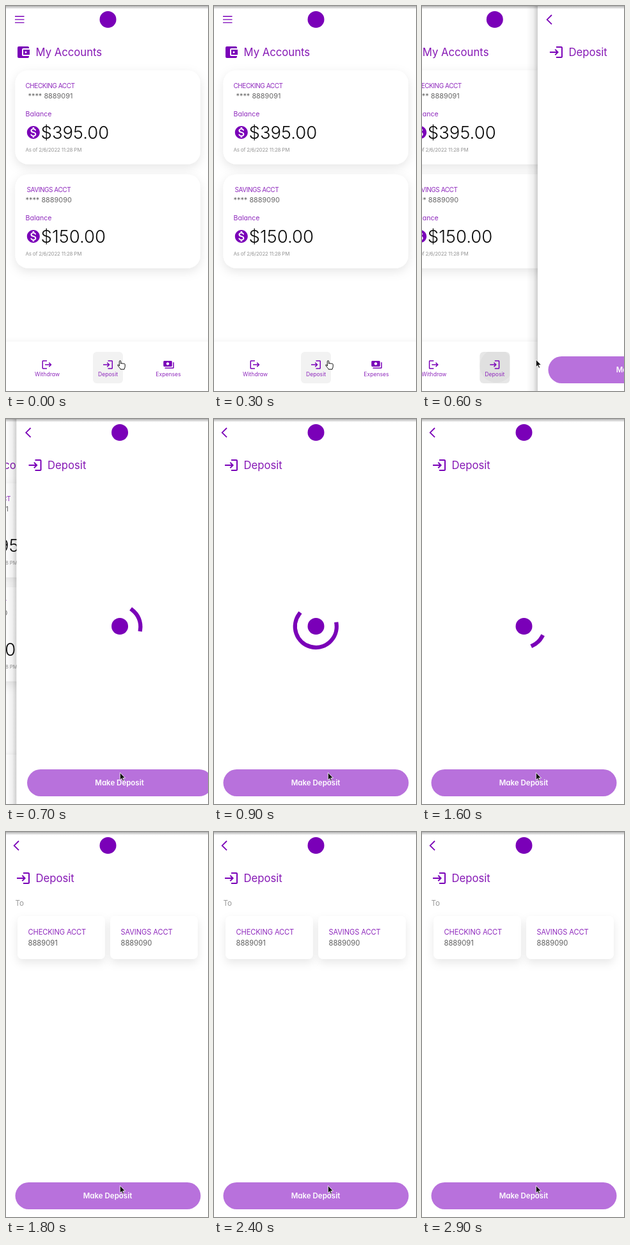
An HTML page for the animation above (3.2 s loop, 316 by 600 pixels).

```html
<!DOCTYPE html>
<html lang="en">
<head>
<meta charset="utf-8">
<title>Deposit flow</title>
<style>
  html, body { margin: 0; width: 100%; height: 100%; overflow: hidden; background: #fff; }
  svg { display: block; width: 100vw; height: 100vh; }
  text { font-family: Inter, "Open Sans", sans-serif; font-feature-settings: "cv11"; fill: #8f2abd; white-space: pre; }
  .icon { fill: #7a00b8; }
  .line { fill: none; stroke: #7a00b8; }
  .title { font-size: 16.7px; fill: #8618b5; }
  .acct { font-size: 10px; letter-spacing: -.45px; }
  .num { font-size: 10.9px; fill: #666; }
  .label { font-size: 10.6px; }
  .sum { font-size: 27.5px; font-weight: 300; fill: #0c0c0c; }
  .date { font-size: 8px; letter-spacing: -.22px; fill: #959595; }
  .tab { font-size: 8.6px; text-anchor: middle; }
  .to { font-size: 11.6px; fill: #999; }
  .pick { font-size: 11.1px; letter-spacing: -.1px; }
  .id { font-size: 11.2px; fill: #606060; }
  .action { font-size: 11.5px; font-weight: 600; text-anchor: middle; fill: #fff; }
</style>
</head>
<body>
<svg viewBox="0 0 316 600" preserveAspectRatio="none" xmlns="http://www.w3.org/2000/svg">
  <defs>
    <filter id="soft" x="-20%" y="-30%" width="140%" height="170%">
      <feDropShadow dx="0" dy="5" stdDeviation="8" flood-color="#000" flood-opacity=".1"/>
    </filter>
    <filter id="low" x="-30%" y="-40%" width="160%" height="200%">
      <feDropShadow dx="0" dy="6" stdDeviation="7" flood-color="#000" flood-opacity=".09"/>
    </filter>
    <filter id="lift" x="-5%" y="-30%" width="110%" height="150%">
      <feDropShadow dx="0" dy="-1" stdDeviation="3" flood-color="#000" flood-opacity=".05"/>
    </filter>
    <linearGradient id="edge">
      <stop offset="0" stop-color="#000" stop-opacity="0"/>
      <stop offset=".6" stop-color="#000" stop-opacity=".06"/>
      <stop offset="1" stop-color="#000" stop-opacity=".2"/>
    </linearGradient>
    <linearGradient id="top" x2="0" y2="1">
      <stop offset="0" stop-color="#000" stop-opacity=".3"/>
      <stop offset="1" stop-color="#000" stop-opacity="0"/>
    </linearGradient>
    <clipPath id="tabClip"><rect x="136" y="539" width="47" height="49" rx="6"/></clipPath>
    <path id="login" d="M11 7 9.6 8.4l2.6 2.6H2v2h10.2l-2.6 2.6L11 17l5-5zM20 19h-8v2h8c1.1 0 2-.9 2-2V5c0-1.1-.9-2-2-2h-8v2h8z"/>
    <path id="logout" d="M17 7l-1.41 1.41L18.17 11H8v2h10.17l-2.58 2.58L17 17l5-5zM4 5h8V3H4c-1.1 0-2 .9-2 2v14c0 1.1.9 2 2 2h8v-2H4z"/>
    <path id="cash" d="M19 14V6c0-1.1-.9-2-2-2H3c-1.1 0-2 .9-2 2v8c0 1.1.9 2 2 2h14c1.1 0 2-.9 2-2zm-9-1c-1.66 0-3-1.34-3-3s1.34-3 3-3 3 1.34 3 3-1.34 3-3 3zm13-6v11c0 1.1-.9 2-2 2H4v-2h17V7z"/>
    <path id="wallet" d="M21 18v1a2 2 0 0 1-2 2H5a2 2 0 0 1-2-2V5a2 2 0 0 1 2-2h14a2 2 0 0 1 2 2v1h-9a2 2 0 0 0-2 2v8a2 2 0 0 0 2 2zm-9-2h10V8H12zm4-2.500a1.500 1.500 0 1 1 0-3 1.500 1.500 0 0 1 0 3z"/>
    <path id="coin" d="M12 2C6.48 2 2 6.48 2 12s4.48 10 10 10 10-4.48 10-10S17.52 2 12 2zm1.41 16.09V20h-2.67v-1.93c-1.71-.36-3.16-1.46-3.27-3.4h1.96c.1 1.05.82 1.87 2.65 1.87 1.96 0 2.4-.98 2.4-1.59 0-.83-.44-1.61-2.67-2.14-2.48-.6-4.18-1.62-4.18-3.67 0-1.72 1.39-2.84 3.11-3.21V4h2.67v1.95c1.86.45 2.79 1.86 2.85 3.39H14.3c-.05-1.11-.64-1.87-2.22-1.87-1.5 0-2.4.68-2.4 1.64 0 .84.65 1.39 2.67 1.91s4.18 1.39 4.18 3.91c-.01 1.83-1.38 2.83-3.12 3.16z"/>
  </defs>

  <g id="home">
    <rect x="-2" width="322" height="600" fill="#fff"/>
    <path class="line" stroke-width="1.4" d="M14 16.300h14.500M14 21.100h14.500M14 25.900h14.500"/>
    <circle class="icon" cx="159.5" cy="21" r="13"/>
    <use href="#wallet" class="icon" x="15" y="60"/>
    <text class="title" x="46.5" y="78">My Accounts</text>
    <g id="accounts"></g>
    <rect x="-2" y="523" width="322" height="80" fill="#fff" filter="url(#lift)"/>
    <rect id="hover" x="136" y="539" width="47" height="49" rx="6"/>
    <circle id="ripple" cx="162" cy="561" r="26" fill="#e0e0e0" clip-path="url(#tabClip)"/>
    <g class="icon">
      <use href="#logout" transform="translate(55 550) scale(.75)"/>
      <use href="#login" transform="translate(150.5 550) scale(.75)"/>
      <use href="#cash" transform="translate(245.5 550) scale(.75)"/>
    </g>
    <text class="tab" x="64.5" y="576.5">Withdraw</text>
    <text class="tab" x="159.5" y="576.5">Deposit</text>
    <text class="tab" x="254" y="576.5">Expenses</text>
  </g>

  <g id="deposit">
    <rect id="shade" x="-19" width="17" height="600" fill="url(#edge)"/>
    <rect x="-2" width="322" height="600" fill="#fff"/>
    <path class="line" stroke-width="1.8" d="M20 14l-7.3 7.2L20 28.4"/>
    <circle class="icon" cx="159.5" cy="21" r="13"/>
    <use href="#login" class="icon" x="15" y="60"/>
    <text class="title" x="46.5" y="78">Deposit</text>
    <g id="loader">
      <circle class="icon" cx="159.5" cy="323" r="13"/>
      <path id="arc" class="line" stroke-width="6.3" stroke-linecap="square"/>
    </g>
    <g id="choices"><text class="to" x="14.5" y="114.5">To</text></g>
    <rect x="14.5" y="546" width="290" height="42" rx="21" fill="#b871dc"/>
    <text class="action" x="159" y="571">Make Deposit</text>
  </g>

  <rect width="316" height="5" fill="url(#top)"/>
  <g fill="#fff" stroke="#111" stroke-width="1" stroke-linejoin="round">
    <path id="hand" d="M177.3 561v-7c0-1.9 2.4-1.9 2.4 0v3.5c.3-1.3 2.2-1.2 2.3.1.5-1.1 2.1-.8 2.2.4.6-.9 2-.6 2 .6v3.2c0 2-1 2.6-1.2 4.4h-5.8c-.4-2-3.2-3.7-4.4-6.1-.6-1.3 1.2-1.9 2.5.9z"/>
    <path id="arrow" d="M178.3 551v11.6l2.6-2.4 1.8 4.1 1.9-.8-1.8-4h3.7z" fill="#111" stroke="#fff" stroke-width=".8"/>
  </g>
</svg>
<script>
const LOOP = 3200, STEP = 100, WIDTH = 320;
const OPEN = 557.4, OPEN_TIME = 258;
const SPIN = 537, SWEEP_TIME = 1333, TURN_TIME = 2222;
const LOADED = 1800;
const $ = id => document.getElementById(id);

const text = (cls, x, y, s) => `<text class="${cls}" x="${x}" y="${y}">${s}</text>`;
const card = (x, y, w, h, r, shadow) =>
  `<rect x="${x}" y="${y}" width="${w}" height="${h}" rx="${r}" fill="#fff" filter="url(#${shadow})"/>`;

function account(y, name, nameX, number, numberX, sum) {
  return card(14.5, y, 289.5, 146, 20, 'soft') +
    text('acct', nameX, y + 27, name) +
    text('num', numberX, y + 43, '**** ' + number) +
    text('label', 30.5, y + 71, 'Balance') +
    `<use href="#coin" class="icon" x="30.8" y="${y + 84.5}"/>` +
    text('sum', 54.5, y + 106, sum) +
    text('date', 30.5, y + 126.5, 'As of 2/6/2022 11:28 PM');
}

function choice(x, name, number) {
  return card(x, 131, 137, 67, 8, 'low') +
    text('pick', x + 16.5, 160, name) +
    text('id', x + 16.5, 177, number);
}

$('accounts').innerHTML =
  account(100.5, 'CHECKING ACCT', 30.5, '8889091', 34.5, '$395.00') +
  account(262.5, 'SAVINGS ACCT', 32.5, '8889090', 30.5, '$150.00');
$('choices').innerHTML +=
  choice(18, 'CHECKING ACCT', '8889091') + choice(163, 'SAVINGS ACCT', '8889090');

function bezier(x1, y1, x2, y2) {
  const at = (a, b, s) => 3 * (1 - s) ** 2 * s * a + 3 * (1 - s) * s * s * b + s ** 3;
  return x => {
    if (x <= 0) return 0;
    if (x >= 1) return 1;
    let lo = 0, hi = 1;
    for (let i = 0; i < 30; i++) {
      const mid = (lo + hi) / 2;
      if (at(x1, x2, mid) < x) lo = mid; else hi = mid;
    }
    return at(y1, y2, lo);
  };
}
const slide = bezier(.35, .91, .33, .97);
const sweep = bezier(.4, 0, .2, 1);

function arcPath(time) {
  const phase = time / SWEEP_TIME % 1;
  const head = sweep(phase * 2) * 1.5 * Math.PI;
  const tail = sweep(phase * 2 - 1) * 1.5 * Math.PI;
  const start = -Math.PI / 2 + tail + time / TURN_TIME * 2 * Math.PI + phase * Math.PI / 2;
  const span = Math.max(head - tail, .001);
  const point = a => `${159.3 + 32.5 * Math.cos(a)} ${323.5 + 32.5 * Math.sin(a)}`;
  return `M${point(start)}A32.5 32.5 0 ${span > Math.PI ? 1 : 0} 1 ${point(start + span)}`;
}

const show = (id, on) => $(id).setAttribute('display', on ? 'inline' : 'none');
const shift = (id, x) => $(id).setAttribute('transform', `translate(${x.toFixed(2)} 0)`);

function render(now) {
  const t = Math.floor(now % LOOP / STEP) * STEP;
  const p = slide((t - OPEN) / OPEN_TIME);
  const opened = t > OPEN;
  shift('home', -p * WIDTH / 3);
  shift('deposit', (1 - p) * WIDTH);
  for (const id of ['deposit', 'arrow', 'ripple']) show(id, opened);
  show('hand', !opened);
  $('hover').setAttribute('fill', opened ? '#e7e7e7' : '#f2f2f2');
  show('shade', p < 1);
  show('loader', t < LOADED);
  show('choices', t >= LOADED);
  if (opened) $('arc').setAttribute('d', arcPath(t - SPIN));
}

const begin = performance.now();
function tick() {
  render(performance.now() - begin);
  requestAnimationFrame(tick);
}
tick();
</script>
</body>
</html>
```
